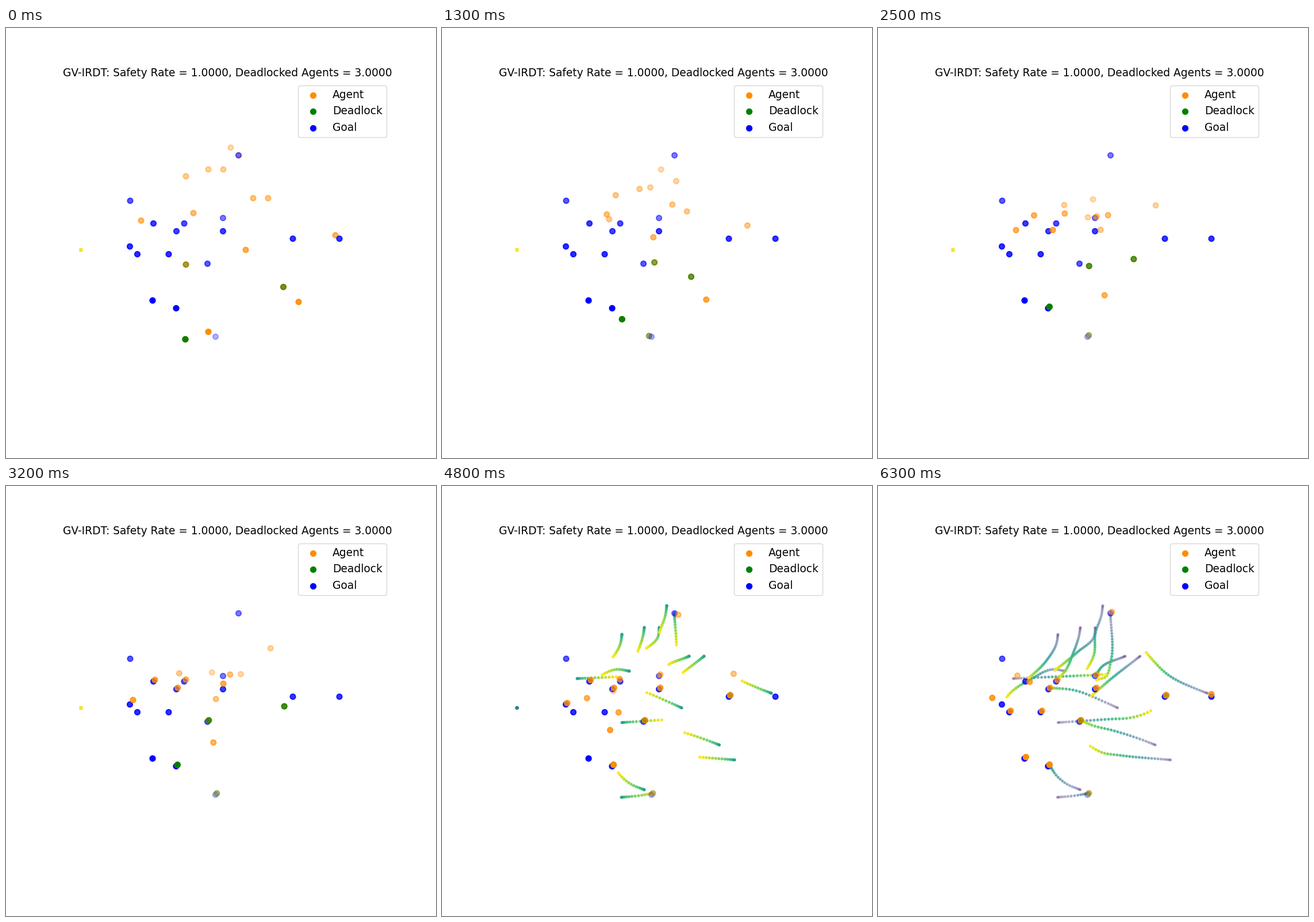
These frames come from a looping animation (748 by 748 pixels, 6.4 s). A matplotlib script:

```python
import numpy as np
import matplotlib.pyplot as plt
from matplotlib.animation import FuncAnimation
from matplotlib.colors import to_rgb

SIZE, DPI = 748, 64
FRAMES, STEP = 64, 100
WINDOW = 31                      # dots in each trail
REST = (130.5, 386)              # where trail dots wait before they start
RAMP = 8                         # frames to reach full speed, and to brake
STOP = np.array([2.3, -2.5])     # agents halt just short of the goal
FONT, EDGE, DOT, TRAIL = 18.667, 2, 9.2, 3.3    # pixels
ORANGE, GREEN, BLUE = "darkorange", "green", "blue"

TIMES = np.arange(FRAMES)
plt.rcParams["font.family"] = "DejaVu Sans"


def pt(px):
    return px * 72 / DPI


def shade(color, alphas):
    return [(*to_rgb(color), a) for a in alphas]


def curve(points, samples=400):
    """Smooth curve through the points."""
    p = np.array(points, float)
    u = np.r_[0, np.cumsum(np.hypot(*np.diff(p, axis=0).T))]
    m = np.gradient(p, u, axis=0)
    q = np.linspace(0, u[-1], samples)
    i = np.clip(np.searchsorted(u, q, side="right") - 1, 0, len(u) - 2)
    h = (u[i + 1] - u[i])[:, None]
    w = (q - u[i])[:, None] / h
    return ((1 + 2 * w) * (1 - w)**2 * p[i] + w * (1 - w)**2 * h * m[i]
            + w**2 * (3 - 2 * w) * p[i + 1] + w**2 * (w - 1) * h * m[i + 1])


def travelled(length, speed):
    """Distance covered: speed up, cruise, brake."""
    end = length / speed + RAMP
    t = np.minimum(TIMES, end)
    gain = np.minimum(t, RAMP)
    brake = np.maximum(t - (end - RAMP), 0)
    return speed * (t - gain + gain**2 / (2 * RAMP) - brake**2 / (2 * RAMP))


class Agent:
    def __init__(self, start, goal, depth, speed, via=(), nudge=None, locked=None):
        self.goal, self.depth, self.locked = goal, depth, locked
        line = curve([start, *via, goal + STOP])
        walk = np.r_[0, np.cumsum(np.hypot(*np.diff(line, axis=0).T))]
        s = travelled(walk[-1], speed)
        self.path = np.column_stack([np.interp(s, walk, c) for c in line.T])
        if nudge:                # pushed aside by a passing agent
            dx, dy, when = nudge
            push = np.exp(-((TIMES - when) / 4) ** 2)
            self.path += push[:, None] * (dx, dy)

        # Depth fading runs from the start's shade to the goal's.
        p = s / walk[-1]
        first = .33 + .67 * (start[1] - 208) / 320
        dip = walk[-1] / 1000 * 4 * p * (1 - p)
        self.fade = np.clip(first + (depth - first) * p - dip, .3, 1)
        if locked is not None:
            first = min(.3 + .7 * (start[1] - 411.5) / 130, 1)
            self.lock_fade = np.where(TIMES < locked, 0, first + (depth - first) * p)


crew = [
    Agent((391, 208), (216, 300.5), .65, 4.4,
          [(389, 223), (378, 257), (376, 292), (326, 350), (272, 355)]),
    Agent((404.5, 221.5), (377.5, 353.5), .77, 5, [(405, 305), (396, 332), (378, 340)]),
    Agent((352, 246), (310, 340), .7, 3.9, [(350, 259), (339, 292), (328, 318)],
          nudge=(-29, -15, 54)),
    Agent((378, 246), (228.5, 393.5), .83, 4.1,
          [(376, 261.5), (347.5, 288.5), (300, 327), (272, 350)]),
    Agent((313, 258), (256.5, 340), .78, 3.9, [(311, 272), (292, 305)], nudge=(5, 3, 63)),
    Agent((430, 296), (377.5, 330.5), .52, 3.5, [(387, 317)], nudge=(10, 0, 32)),
    Agent((456, 296), (283, 393.5), .82, 4.2, [(400, 340), (367, 369), (340, 393)]),
    Agent((326, 322), (215.5, 380), .83, 4.5, [(304.5, 319), (267, 335.5), (225, 366)],
          nudge=(-19, -9, 63)),
    Agent((235, 335), (580, 366.5), .8, 6.2, [(350, 330), (416, 327), (470, 324), (554, 341)]),
    Agent((573, 360.5), (404.5, 221.5), .52, 5,
          [(553.5, 353), (507.5, 330.5), (458.5, 280.5)]),
    Agent((417, 386), (296.5, 353.5), .75, 6, [(396, 376.5), (340, 355)], nudge=(12, 0, 55)),
    Agent((509, 476.5), (255, 474), 1, 5.5,
          [(421, 468.5), (391, 464), (354, 441), (324, 414), (302, 412), (285, 441)]),
    Agent((313, 411.5), (499, 366.5), .8, 6.3, [(403.5, 405.5), (440, 403), (476, 390)],
          locked=0),
    Agent((482.5, 450.5), (350.5, 410), .65, 5.8, [(462, 442.5), (407.5, 425), (372, 416)],
          locked=0),
    Agent((352, 528.5), (296, 487.5), 1, 5, [(328.5, 518.5), (309, 502)], locked=4),
    Agent((312, 541.5), (364.5, 537), .3, 6, [(340, 539)], locked=0),
]
stuck = [a for a in crew if a.locked is not None]
paths = np.array([a.path for a in crew])         # agent, time, xy
stuck_paths = np.array([a.path for a in stuck])
fades = np.array([a.fade for a in crew])
stuck_fades = np.array([a.lock_fade for a in stuck])

fig = plt.figure(figsize=(SIZE / DPI, SIZE / DPI), dpi=DPI, facecolor="white")
ax = fig.add_axes([0, 0, 1, 1])
ax.set(xlim=(0, SIZE), ylim=(SIZE, 0))
ax.axis("off")


def dots(points, colors, width=DOT, label=None):
    xy = np.asarray(points, float)
    return ax.scatter(xy[:, 0], xy[:, 1], s=pt(width) ** 2, c=colors,
                      linewidths=pt(EDGE), label=label)


def trail_points(k):
    t = k - FRAMES + 1 + np.arange(WINDOW)
    xy = paths[:, np.maximum(t, 0)].transpose(1, 0, 2).copy()
    xy[t < 0] = REST
    return xy.reshape(-1, 2)


ramp = plt.get_cmap("viridis")(np.linspace(0, 1, WINDOW))
ramp[:, 3] = np.linspace(.1, 1, WINDOW)
trail = dots(trail_points(0), np.repeat(ramp, len(crew), axis=0), TRAIL)
trail.set_zorder(1)

agents = dots(paths[:, 0], shade(ORANGE, fades[:, 0]))
dead = dots(stuck_paths[:, 0], shade(GREEN, stuck_fades[:, 0]))
goals = dots([a.goal for a in crew], shade(BLUE, [a.depth for a in crew]))

keys = [dots([(-50, -50)], [color], label=name)
        for color, name in ((ORANGE, "Agent"), (GREEN, "Deadlock"), (BLUE, "Goal"))]
legend = ax.legend(handles=keys, fontsize=pt(FONT), loc="upper right", borderaxespad=0,
                   bbox_to_anchor=(662, 99.5), bbox_transform=ax.transData)
legend.get_frame().set_linewidth(pt(1.33))
legend.set_zorder(10)

ax.text(671.5, 84, "GV-IRDT: Safety Rate = 1.0000, Deadlocked Agents = 3.0000",
        fontsize=pt(FONT), ha="right", va="baseline")


def layers(k):
    """Back to front order as the view depth changes."""
    if k < 25:
        return agents, dead, goals
    if k < 48:
        return goals, agents, dead
    return goals, dead, agents


def draw(k):
    trail.set_offsets(trail_points(k))
    for group, path, color, alpha in ((agents, paths, ORANGE, fades),
                                      (dead, stuck_paths, GREEN, stuck_fades)):
        group.set_offsets(path[:, k])
        rgba = shade(color, alpha[:, k])
        group.set_facecolor(rgba)
        group.set_edgecolor(rgba)
    for z, group in enumerate(layers(k), 2):
        group.set_zorder(z)
    return trail, agents, dead, goals


anim = FuncAnimation(fig, draw, frames=FRAMES, interval=STEP, repeat=True, repeat_delay=0)
plt.show()
```
